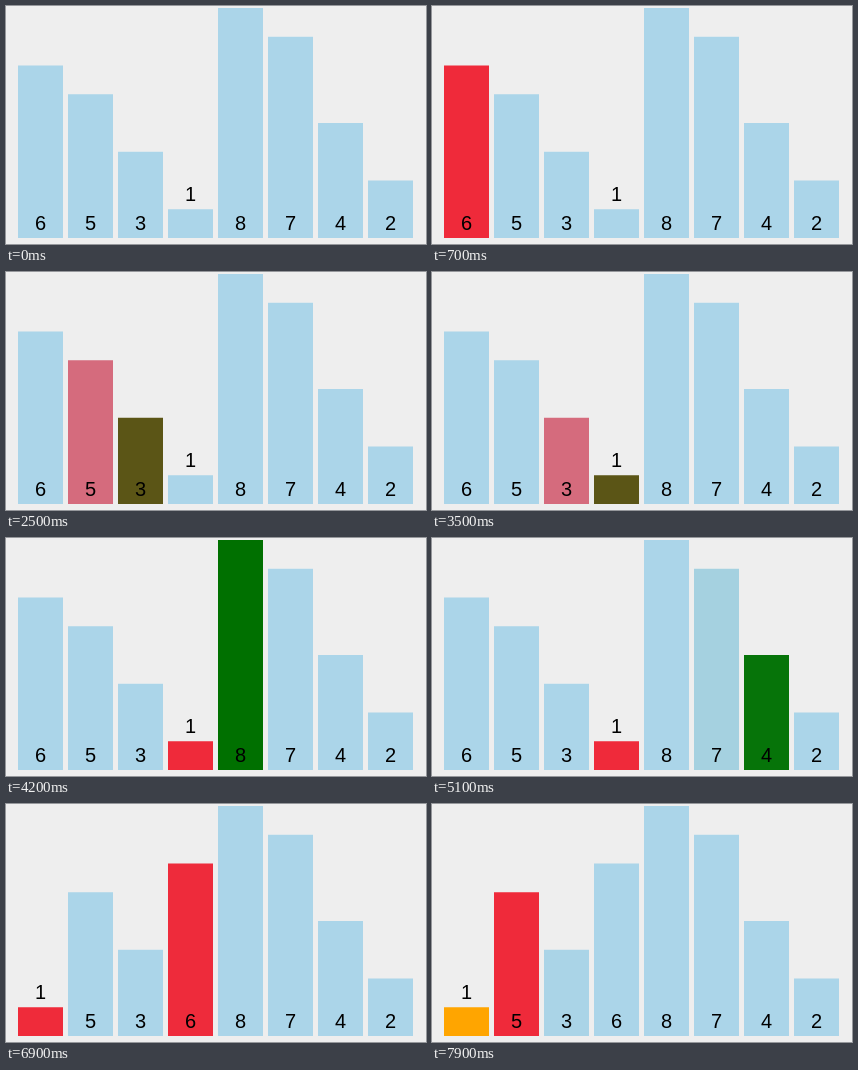
An HTML page for the animation above (8 s loop, 420 px wide and 238 px high).

```html
<!DOCTYPE html>
<html lang="en">
<head>
<meta charset="utf-8">
<title>Selection sort</title>
<style>
  html, body { margin: 0; width: 100%; height: 100%; overflow: hidden; background: #eee; }
  svg { display: block; width: 420px; height: 238px; }
  text { font: 20px "Liberation Sans", Arial, sans-serif; text-anchor: middle; }
</style>
</head>
<body>
<svg id="stage" viewBox="0 0 420 238"></svg>
<script>
const LOOP = 8000, TICK = 100;           // ten pictures a second
const FIRST = 363, STEP = 500, FADE = 300;
const BASE = 232, UNIT = 28.75, PITCH = 50, WIDTH = 45, LEFT = 12;

const BLUE = [171, 213, 233], RED = [239, 42, 58];
const GREEN = [0, 112, 0], ORANGE = [255, 165, 0];

const values = [6, 5, 3, 1, 8, 7, 4, 2];

// Each step maps a value to its new colour; a number is a new slot.
const steps = [
  { 6: RED },
  { 5: GREEN },
  { 6: BLUE, 5: RED },
  { 3: GREEN },
  { 5: BLUE, 3: RED },
  { 1: GREEN },
  { 3: BLUE, 1: RED },
  { 8: GREEN },
  { 8: BLUE, 7: GREEN },
  { 7: BLUE, 4: GREEN },
  { 4: BLUE, 2: GREEN },
  { 2: BLUE, 6: RED },
  { 6: 3, 1: 0 },
  { 6: BLUE, 1: ORANGE },
  { 5: RED },
  { 3: GREEN }
];

const stage = document.getElementById("stage");

function add(parent, name, attrs = {}) {
  const el = document.createElementNS("http://www.w3.org/2000/svg", name);
  for (const key in attrs) el.setAttribute(key, attrs[key]);
  return parent.appendChild(el);
}

const bars = values.map((value, slot) => {
  const height = value * UNIT;
  const group = add(stage, "g");
  const rect = add(group, "rect", { y: BASE - height, width: WIDTH, height });
  const label = add(group, "text", {
    x: WIDTH / 2,
    y: value === 1 ? BASE - height - 8 : BASE - 8
  });
  label.textContent = value;
  return { value, slot, group, rect };
});

const mix = (a, b, k) => a + (b - a) * k;

function ease(t) {
  t = Math.min(1, Math.max(0, t));
  return t < 0.5 ? 4 * t ** 3 : 1 - 4 * (1 - t) ** 3;
}

function draw(time) {
  for (const bar of bars) {
    let color = BLUE, slot = bar.slot;
    steps.forEach((step, i) => {
      const goal = step[bar.value];
      if (goal === undefined) return;
      const k = ease((time - FIRST - i * STEP) / FADE);
      if (Array.isArray(goal)) color = color.map((c, n) => mix(c, goal[n], k));
      else slot = mix(slot, goal, k);
    });
    bar.rect.setAttribute("fill", `rgb(${color.map(Math.round)})`);
    bar.group.setAttribute("transform", `translate(${LEFT + slot * PITCH} 0)`);
  }
}

const start = performance.now();

function frame() {
  const time = (performance.now() - start) % LOOP;
  draw(Math.floor(time / TICK) * TICK);
  requestAnimationFrame(frame);
}
frame();
</script>
</body>
</html>
```
